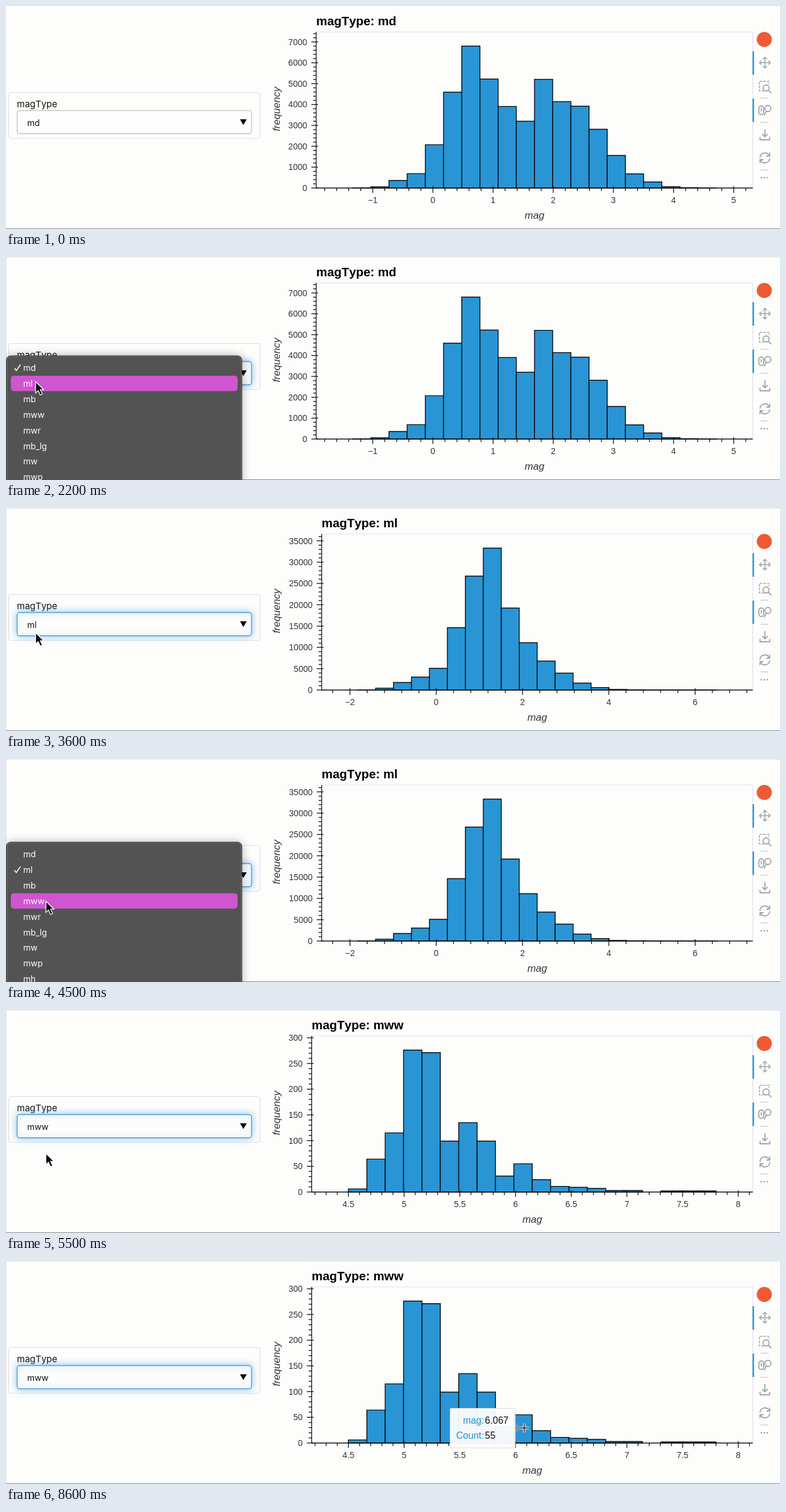
Write an HTML page with a canvas that moves like this. It is 1280 by 370 pixels and loops after 8700 ms.

```html
<!DOCTYPE html>
<html lang="en">
<head>
<meta charset="utf-8">
<title>Histogram by magType</title>
<style>
  html, body { margin: 0; width: 100%; height: 100%; overflow: hidden; background: #fdfdfc; }
  canvas { display: block; }
</style>
</head>
<body>
<canvas id="stage" width="1280" height="370"></canvas>
<script>
const ctx = document.getElementById('stage').getContext('2d');
const LOOP = 8700, STEP = 100, FADE = 200;
const SANS = '"Liberation Sans", Arial, sans-serif', UI = 'Inter, sans-serif';
const RIGHT = 1235, TOP = 43, BASE = 302, ROW = 25.9;
const BLUE = '#2995d5', GREY = '#a1a6a9';

// zero and unit place the x axis in pixels; xStep and yStep are the major tick spacings
const charts = {
  md: { left: 513, zero: 706, unit: 99.5, xStep: 1, yStep: 1000, counts:
    [10, 60, 360, 690, 2075, 4590, 6800, 5220, 3910, 3200, 5210, 4140, 3920, 2815, 1560, 680, 290, 70, 15, 5] },
  ml: { left: 522, zero: 711.5, unit: 71.35, xStep: 2, yStep: 5000, counts:
    [20, 420, 1770, 3050, 5090, 14640, 26730, 33300, 19240, 11100, 6790, 3960, 1630, 570, 140, 60, 20, 10, 5, 5] },
  mww: { left: 505.5, zero: -262.6, unit: 184.2, xStep: 0.5, yStep: 50, counts:
    [6, 64, 115, 276, 271, 99, 135, 99, 31, 55, 24, 11, 9, 7, 3, 3, 0, 2, 2, 2] },
};
const options = ['md', 'ml', 'mb', 'mww', 'mwr', 'mb_lg', 'mw', 'mwp', 'mh', 'ms'];

// first is the y of the top row
const menus = [
  { open: 1000, close: 2610, first: 184, checked: 0 },
  { open: 3900, close: 5410, first: 158, checked: 1 },
];
// time, x, y of the pointer
const pointer = [
  [200, 64, 350], [800, 38, 186], [1000, 38, 175], [1300, 38, 175], [2000, 49, 207], [3900, 49, 207],
  [4500, 66, 236], [5000, 66, 238], [6400, 66, 238], [7100, 633, 296], [8400, 857, 277],
];

function pointerAt(t) {
  const n = pointer.findIndex(k => k[0] > t);
  if (n < 0) return pointer.at(-1).slice(1);
  if (n === 0) return null;
  const [a, b] = [pointer[n - 1], pointer[n]];
  const u = (t - a[0]) / (b[0] - a[0]), e = u * u * (3 - 2 * u);
  return [a[1] + (b[1] - a[1]) * e, a[2] + (b[2] - a[2]) * e];
}

function text(s, x, y, font, color = '#222', align = 'left') {
  ctx.font = font;
  ctx.fillStyle = color;
  ctx.textAlign = align;
  ctx.fillText(s, x, y);
}

function line(x1, y1, x2, y2, color = '#111', width = 1.3) {
  ctx.strokeStyle = color;
  ctx.lineWidth = width;
  ctx.beginPath();
  ctx.moveTo(x1, y1);
  ctx.lineTo(x2, y2);
  ctx.stroke();
}

function box(x, y, w, h, r, fill, stroke, width = 1) {
  ctx.beginPath();
  ctx.roundRect(x, y, w, h, r);
  if (fill) { ctx.fillStyle = fill; ctx.fill(); }
  if (stroke) { ctx.strokeStyle = stroke; ctx.lineWidth = width; ctx.stroke(); }
}

function shape(d, x, y, fill, stroke, width = 1.6) {
  const path = new Path2D(d);
  ctx.save();
  ctx.translate(x, y);
  if (fill) { ctx.fillStyle = fill; ctx.fill(path); }
  if (stroke) { ctx.strokeStyle = stroke; ctx.lineWidth = width; ctx.stroke(path); }
  ctx.restore();
}

// Bins fill the middle of the plot, with a tenth of their span as padding on each side
function layout({ left, counts }) {
  const binWidth = (RIGHT - left) / 24;
  return { binWidth, start: left + 2 * binWidth, scale: (BASE - TOP) / (1.1 * Math.max(...counts)) };
}

function drawChart(name) {
  const chart = charts[name], { left, zero, unit, xStep, yStep, counts } = chart;
  const { binWidth, start, scale } = layout(chart), mid = (left + RIGHT) / 2;
  line(left, TOP, RIGHT, TOP, '#e2e0ee', 1.2);
  line(RIGHT, TOP, RIGHT, BASE, '#e2e0ee', 1.2);

  counts.forEach((count, i) => {
    if (count) box(start + i * binWidth, BASE - count * scale, binWidth, count * scale, 0, BLUE, '#0b0b0b', 1.4);
  });

  line(left, TOP, left, BASE);
  line(left, BASE, RIGHT, BASE);
  for (let i = 0; BASE - i * yStep / 5 * scale >= TOP; i++) {
    const y = BASE - i * yStep / 5 * scale, major = i % 5 === 0;
    line(left - (major ? 8 : 5), y, left + (major ? 3 : 0), y);
    if (major) text(i / 5 * yStep, left - 15, y + 5, `14px ${SANS}`, '#333', 'right');
  }
  const minor = xStep * unit / 5;
  for (let i = Math.ceil((left - zero) / minor); zero + i * minor <= RIGHT; i++) {
    const x = zero + i * minor, major = i % 5 === 0;
    line(x, BASE - (major ? 3 : 0), x, BASE + (major ? 8 : 5));
    if (major) text(String(i / 5 * xStep).replace('-', '\u2212'), x, 326.5, `14px ${SANS}`, '#333', 'center');
  }

  text(`magType: ${name}`, left, 32, `bold 20.4px ${SANS}`, '#000');
  text('mag', mid, 352.5, `italic 16.8px ${SANS}`, '#333', 'center');
  ctx.save();
  ctx.translate(453, 171);
  ctx.rotate(-Math.PI / 2);
  text('frequency', 0, 0, `italic 16.8px ${SANS}`, '#333', 'center');
  ctx.restore();
}

function drawToolbar() {
  const x = 1255;
  ctx.fillStyle = '#ee5a34';
  ctx.beginPath();
  ctx.arc(1254, 55.5, 12.5, 0, 7);
  ctx.fill();
  for (const y of [75, 153.5]) box(1234.5, y, 2.6, 39, 0, '#2a9bd6');
  for (const y of [153, 193, 272]) line(1248, y, 1261, y, '#d0d0d8', 1.5);
  ctx.lineCap = ctx.lineJoin = 'round';
  shape('M-9 0H9M0-9V9M-6-3L-9 0L-6 3M6-3L9 0L6 3M-3-6L0-9L3-6M-3 6L0 9L3 6', x, 94, null, GREY);
  ctx.setLineDash([3, 3]);
  shape('M-2 7H-9V-9H7V-5', x, 134, null, GREY);
  ctx.setLineDash([]);
  shape('M7 2A5 5 0 1 1-3 2A5 5 0 1 1 7 2M6 6L10 10', x, 134, null, GREY, 1.8);
  shape('M-2-3V3A4 4 0 0 1-10 3V-3A4 4 0 0 1-2-3M-6-3V1M10-3A5 5 0 1 1 0-3A5 5 0 1 1 10-3M2 2L-1 8', x, 173, null, GREY, 1.8);
  shape('M-8 4V8H8V4M0-9V3M-4-1L0 3L4-1', x, 214, null, GREY, 1.8);
  shape('M-8-1A8 8 0 0 1 7-4M8-8V-3H3M8 1A8 8 0 0 1-7 4M-8 8V3H-3', x, 252, null, GREY, 1.8);
  ctx.lineCap = 'butt';
  ctx.lineJoin = 'miter';
  for (const dx of [-6, -1, 4]) box(x + dx - 1, 284, 2, 2, 0, '#8c9094');
}

function drawSelect(value, focused) {
  box(4.5, 143.5, 415.5, 76, 4, null, '#dedee4', 1.2);
  text('magType', 18, 167.5, `15px ${UI}`, '#111');
  ctx.save();
  if (focused) {
    ctx.shadowColor = 'rgba(80,165,230,.65)';
    ctx.shadowBlur = 12;
  }
  box(18.5, 173.5, 387.5, 38.5, 4, '#fdfdfd', focused ? '#4a9fdc' : '#c6c8b8', 1.4);
  ctx.restore();
  text(value, 35, 198.5, `14px ${UI}`, '#111');
  shape('M-5.5-4.5H5.5L0 5Z', 392.5, 192.5, '#000');
}

function drawMenu({ first, checked, close }, t, y) {
  ctx.save();
  ctx.globalAlpha = Math.min(1, (close - t) / FADE);
  ctx.shadowColor = 'rgba(0,0,0,.3)';
  ctx.shadowBlur = 16;
  box(1, first - 20, 389, 300, 7, '#525352');
  ctx.shadowColor = 'transparent';
  box(1.5, first - 19, 387.5, 300, 6, null, '#747474');
  box(0.5, first - 20, 389.5, 302, 7, null, '#333');
  const hovered = Math.floor((y - first + 13) / ROW);
  options.forEach((name, i) => {
    const rowY = first + i * ROW;
    if (i === hovered) box(8, rowY - 13, 375, 25.5, 5, '#d055d0');
    if (i === checked) shape('M-5 .5L-2 4.5L5-5.5', 19, rowY, null, '#fff', 1.6);
    text(name, 28.5, rowY + 5, `14px ${UI}`, '#fff');
  });
  ctx.restore();
}

function drawTooltip(name, x, y) {
  const chart = charts[name], { start, binWidth, scale } = layout(chart);
  const bin = Math.floor((x - start) / binWidth), count = chart.counts[bin];
  if (!count || y < BASE - count * scale || y > BASE) return;
  const mag = 4.5 + 0.165 * (bin + 0.5) - 1e-6;
  const side = x < 853 ? 1 : -1;
  const left = side > 0 ? x + 15 : x - 122.5;
  shape(`M${side * 15}-9L${side * 5} 0L${side * 15} 9Z`, x, y, 'rgba(144,149,153,.75)');
  box(left, y - 32.5, 107.5, 65.5, 1, 'rgba(253,253,253,.95)', '#dcdcdc');
  [['mag:', mag.toFixed(3)], ['Count:', count]].forEach(([label, value], i) => {
    const baseline = y - 7 + i * 24.5;
    text(label, left + 56, baseline, `15.6px ${SANS}`, '#2590cc', 'right');
    text(value, left + 57.5, baseline, `15.6px ${SANS}`, '#111');
  });
}

function drawPointer(x, y, cross) {
  if (cross) {
    const plus = 'M-8 0H8M0-8V8';
    shape(plus, x, y, null, '#fff', 4);
    shape(plus, x, y, null, '#111', 1.5);
  } else {
    shape('M0 0V18.5L4.3 14.6L7.6 22L11 20.5L7.8 13.2H13.5Z', x, y, '#000', '#fff', 1.3);
  }
}

function draw(t) {
  ctx.fillStyle = '#fdfdfc';
  ctx.fillRect(0, 0, 1280, 370);
  ctx.fontKerning = 'none';
  const name = t < 2700 ? 'md' : t < 5500 ? 'ml' : 'mww';
  const at = pointerAt(t);

  if (at) {
    line(0, 0.5, 1280, 0.5, '#e4e4e6', 1);
    line(0.5, 0, 0.5, 370, '#e4e4e6', 1);
  }
  line(0, 369.5, 1280, 369.5, '#85878a', 1);
  drawChart(name);
  drawToolbar();
  drawSelect(name, t >= 1000);
  if (!at) return;

  const [x, y] = at;
  const menu = menus.find(m => t >= m.open && t < m.close);
  if (menu) drawMenu(menu, t, y);
  const inPlot = x > charts[name].left && x < RIGHT && y > TOP && y < BASE;
  if (inPlot && t >= 7200) drawTooltip(name, x, y);
  drawPointer(x, y, inPlot);
}

function tick() {
  const t = performance.now() % LOOP;
  draw(Math.floor(t / STEP) * STEP);
  requestAnimationFrame(tick);
}
tick();
</script>
</body>
</html>
```
